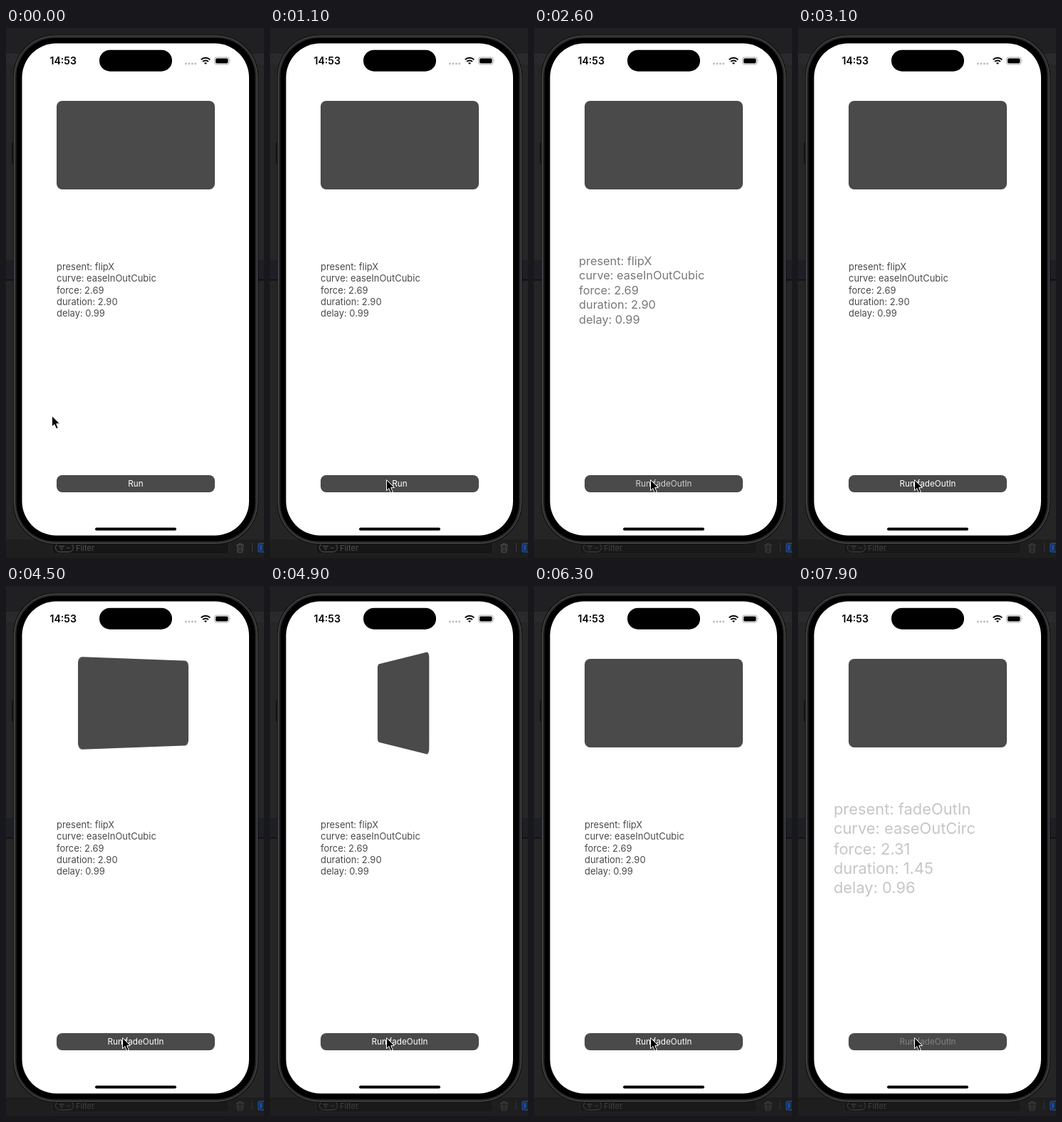
Write an HTML page that moves like this. It is 362 px wide and 742 px high and loops after 8000 ms.

```html
<!DOCTYPE html>
<html lang="en">
<head>
<meta charset="utf-8">
<title>Animation presets</title>
<style>
  html, body { margin: 0; width: 100%; height: 100%; overflow: hidden; background: #252526; }
  #stage { position: relative; width: 362px; height: 742px; overflow: hidden; font-family: Inter, Roboto, sans-serif; }
  #stage > * { position: absolute; }
  svg { left: 0; top: 0; }
  .panel { left: 71px; width: 222px; border-radius: 8px; background: #4a4a4a; }
  #card { top: 102px; height: 124px; }
  #button { top: 626px; height: 24px; line-height: 24px; text-align: center; font-size: 11.7px; color: #fff; }
  #info {
    left: 71px; top: 326px; white-space: pre; color: #4a4a4a;
    font-size: 12.95px; line-height: 16.35px; transform-origin: 30.5px 50%;
  }
  #clock { left: 61.5px; top: 37px; font-size: 14.1px; line-height: 18px; font-weight: 600; color: #000; }
</style>
</head>
<body>
<div id="stage">
  <svg width="362" height="742" viewBox="0 0 362 742">
    <!-- desktop behind the phone -->
    <rect width="362" height="742" fill="#252526"/>
    <rect width="362" height="36" fill="#202023"/>
    <rect y="36" width="362" height="15" fill="#2a2a2c"/>
    <rect y="51" width="362" height="274" fill="#262627"/>
    <rect y="325" width="362" height="27" fill="#1e1f24"/>
    <rect y="352" width="362" height="1.5" fill="#0c0c0c"/>
    <rect y="716" width="362" height="26" fill="#1e1e1f"/>
    <g id="filter" fill="none" stroke="#555">
      <rect x="64.5" y="716.5" width="248" height="20" rx="5" fill="#171718" stroke="#262627"/>
      <rect x="69.5" y="721.5" width="25" height="12" rx="6"/>
      <path d="M74 725.5h8M75.5 728h5M77 730.5h2M85 726.5l2.5 2.5 2.5-2.5"/>
      <text x="98" y="731.5" font-size="11" fill="#505050" stroke="none">Filter</text>
      <path d="M323 724h11M326.5 724v-2h4v2M324.5 724l.7 10h6.6l.7-10M327 726v6M330 726v6"/>
      <path d="M345.5 721v13" stroke="#3a3a3a"/>
    </g>
    <rect x="354" y="721.5" width="18" height="12" rx="2.5" fill="#18293f" stroke="#1d4c91" stroke-width="1.5"/>
    <rect x="356" y="723.5" width="3.5" height="8" fill="#1d4c91"/>

    <!-- phone -->
    <rect x="8" y="160" width="4" height="30" rx="1" fill="#151515"/>
    <rect x="10" y="9.5" width="344" height="713.5" rx="58" fill="#111"/>
    <rect x="11.5" y="11" width="341" height="710.5" rx="57" fill="#29292a" stroke="#505052"/>
    <rect x="14.5" y="14" width="335" height="704.5" rx="54" fill="#000"/>
    <rect x="22.5" y="21.5" width="318.5" height="689" rx="48" fill="#fff"/>
    <rect x="131" y="30.7" width="102" height="30" rx="15"/>
    <rect x="125" y="699.5" width="114" height="4" rx="2"/>

    <!-- status icons -->
    <g fill="#bcbcbc">
      <circle cx="252.5" cy="50" r="1.4"/><circle cx="256.9" cy="50" r="1.4"/>
      <circle cx="261.3" cy="50" r="1.4"/><circle cx="265.7" cy="50" r="1.4"/>
    </g>
    <g fill="none" stroke="#000" stroke-width="2">
      <path d="M273.7 44.4a9 9 0 0 1 12.6 0M276 47.1a5.7 5.7 0 0 1 8 0"/>
      <path d="M280 51.1l-2-2a2.9 2.9 0 0 1 4 0z" fill="#000" stroke="none"/>
    </g>
    <rect x="292.5" y="41" width="20.5" height="10" rx="3" fill="none" stroke="#aaa"/>
    <rect x="294" y="42.5" width="17.5" height="7" rx="1.8"/>
    <path d="M314.2 44.3q1.5 1.7 0 3.4z" fill="#aaa"/>
  </svg>

  <div id="clock">14:53</div>
  <div id="card" class="panel"></div>
  <div id="info"></div>
  <div id="button" class="panel"><span id="title"></span></div>

  <svg id="cursor" width="14" height="22" viewBox="-1 -1 14 22" overflow="visible">
    <path d="M0 0V15.2L3.4 12 6 18.2 8.7 17 6.2 11H11Z" fill="#000" stroke="#fff" stroke-linejoin="round"/>
  </svg>
</div>

<script>
const LOOP = 8000, STEP = 100;
const FLIP = { start: 3410, duration: 2800, depth: 450 };
const [card, info, title, cursor, filter] =
  ['card', 'info', 'title', 'cursor', 'filter'].map(id => document.getElementById(id));

const describe = (preset, curve, force, duration, delay) =>
  `present: ${preset}\ncurve: ${curve}\nforce: ${force}\nduration: ${duration}\ndelay: ${delay}`;
const FIRST = describe('flipX', 'easeInOutCubic', '2.69', '2.90', '0.99');
const SECOND = describe('fadeOutIn', 'easeOutCirc', '2.31', '1.45', '0.96');

// time, zoom amount: 0 is at rest, 1 is doubled and invisible
const ZOOM = [
  [1600, 0], [1700, .28], [1800, .63], [1900, .87], [2000, 1],
  [2400, 1], [2500, .4], [2600, .26], [2700, .16], [2800, .09], [2900, .04], [3100, 0],
  [7000, 0], [7100, .08], [7200, .3], [7300, .62], [7400, .85], [7500, 1],
  [7800, 1], [7900, .69]
];

const clamp = x => Math.min(1, Math.max(0, x));
const smooth = x => x * x * (3 - 2 * x);

function track(keys, t) {
  const i = keys.findIndex(k => k[0] > t);
  if (i === 0) return keys[0][1];
  if (i < 0) return keys[keys.length - 1][1];
  const [t0, a] = keys[i - 1], [t1, b] = keys[i];
  return a + (b - a) * (t - t0) / (t1 - t0);
}

// cubic-bezier(.645, .045, .355, 1)
function easeInOutCubic(x) {
  const axis = (u, a, b) => 3 * (1 - u) ** 2 * u * a + 3 * (1 - u) * u * u * b + u ** 3;
  let lo = 0, hi = 1;
  for (let i = 0; i < 24; i++) {
    const mid = (lo + hi) / 2;
    if (axis(mid, .645, .355) < x) lo = mid; else hi = mid;
  }
  return axis(lo, .045, 1);
}

function setText(el, text) {
  if (el.textContent !== text) el.textContent = text;
}

function draw(t) {
  const zoom = track(ZOOM, t);
  setText(info, t < 7100 ? FIRST : SECOND);
  info.style.transform = `scale(${1 + zoom})`;
  info.style.opacity = 1 - zoom;
  setText(title, t < 2000 ? 'Run' : 'Run fadeOutIn');
  title.style.opacity = 1 - zoom;

  const x = (t - FLIP.start) / FLIP.duration;
  const turn = easeInOutCubic(clamp(x));
  card.style.transform = x > 0 && x < 1
    ? `perspective(${FLIP.depth / turn}px) rotateY(${180 * turn}deg)` : 'none';

  const move = smooth(clamp(t / 900));
  cursor.style.transform = `translate(${63.5 + 99 * move}px, ${542 + 89.5 * move}px)`;
  filter.style.opacity = t < 1700 ? 1 : .7;
}

const begin = performance.now();
function frame() {
  const t = (performance.now() - begin) % LOOP;
  draw(Math.floor(t / STEP) * STEP);
  requestAnimationFrame(frame);
}
frame();
</script>
</body>
</html>
```
